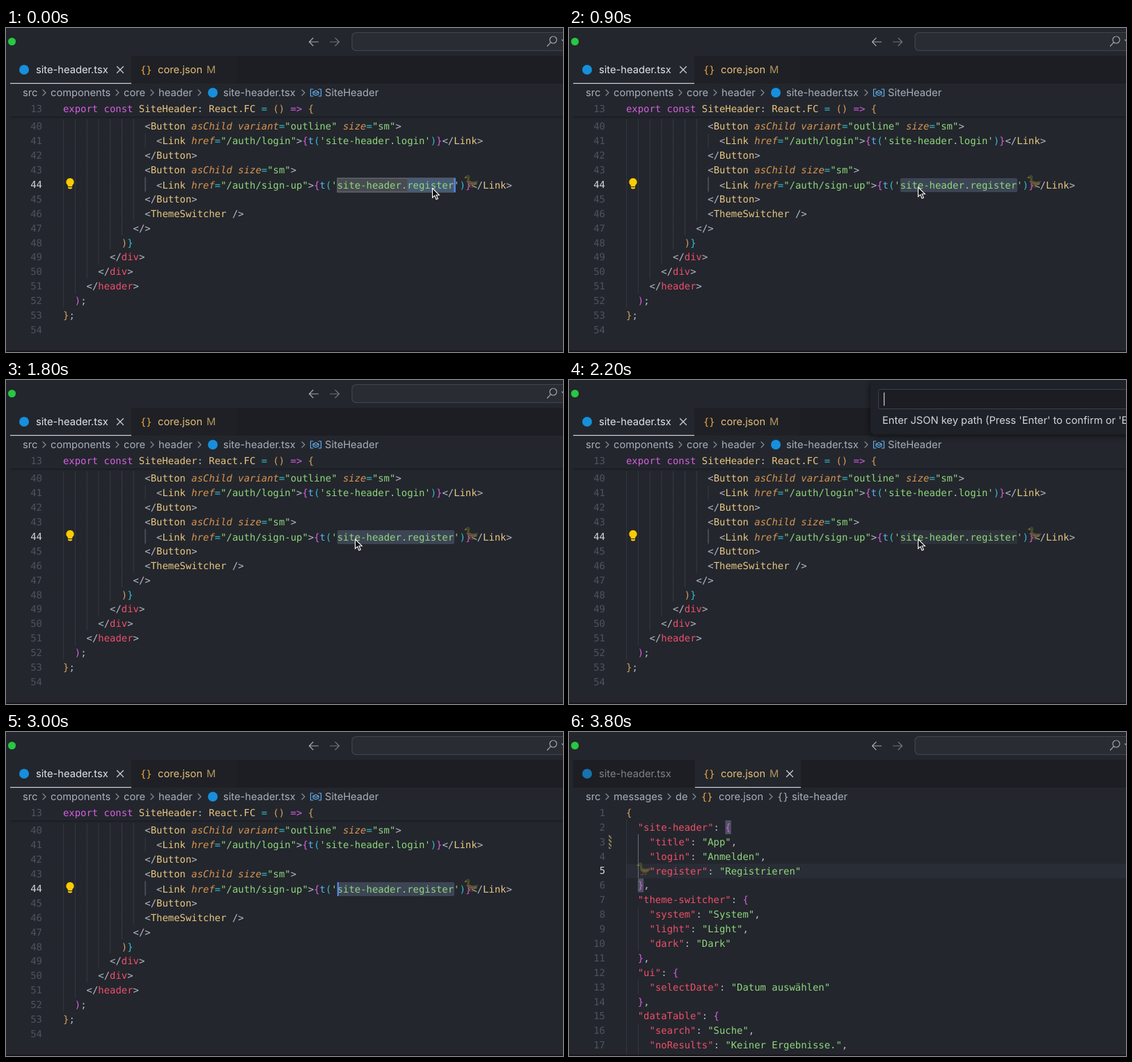
An HTML page for the animation above (3.9 s loop, 800 by 466 pixels).

```html
<!DOCTYPE html>
<html lang="en">
<head>
<meta charset="utf-8">
<title>Editor: jump to a translation key</title>
<style>
  html, body { margin: 0; width: 100%; height: 100%; overflow: hidden; background: #23262d; }
  svg { display: block; width: 800px; height: 466px; }
  text { white-space: pre; text-rendering: geometricPrecision; }
  .code { font: 13.92px "DejaVu Sans Mono", monospace; }
  .ui { font: 14.7px Inter, sans-serif; }
  .num { text-anchor: end; }
  .line { fill: none; stroke-width: 1.2; stroke-linecap: round; stroke-linejoin: round; }
</style>
</head>
<body>
<svg viewBox="0 0 800 466">
  <defs>
    <linearGradient id="shade" x2="0" y2="1">
      <stop stop-color="#14161a" stop-opacity=".55"/>
      <stop offset="1" stop-color="#14161a" stop-opacity="0"/>
    </linearGradient>
    <pattern id="hatch" width="4" height="4" patternUnits="userSpaceOnUse" patternTransform="rotate(45)">
      <rect width="4" height="2" fill="#8c8660"/>
    </pattern>
    <filter id="blur" x="-20%" y="-20%" width="140%" height="150%"><feGaussianBlur stdDeviation="5"/></filter>
  </defs>
  <rect width="800" height="466" fill="#23262d"/>
  <rect x="6" y="40" width="794" height="40" fill="#1c1e23"/>
  <circle cx="8.5" cy="19.5" r="5.5" fill="#28c840"/>
  <g class="line" stroke="#a3a7ae">
    <path d="M448.500 20H435.500M441 14.500L435.500 20L441 25.500"/>
    <path stroke="#70747b" d="M465.500 20H478.500M473 14.500L478.500 20L473 25.500"/>
    <rect x="497" y="6.500" width="320" height="26" rx="6" fill="#292c32" stroke="#42454b"/>
    <circle cx="786" cy="17" r="5"/>
    <path d="M782.400 20.600L777.500 26M798.500 17L801 19.500"/>
  </g>
  <g id="tsx"></g>
  <g id="json"></g>
  <g id="duck">
    <path d="M9 15L8 18H5M12 15L13 18H10" class="line" stroke="#8c4538"/>
    <path d="M0 4.500L2.500 2.500Q5-1 7.500 1.500Q8.500 4 7 8Q10 10 14 10L20 9Q18 15 12 15.500Q6 15 5 11Q4 8 5 5.500Z" fill="#5f5d2d"/>
    <path d="M2.500 2.500Q5-1 7.500 1.500Q8 3.500 6.500 5L4 5Z" fill="#3d5428"/>
    <path d="M8 11.500Q12 14 16 11.500" class="line" stroke="#8a7341"/>
    <path d="M0 4.500L2.500 2.500L4 5Z" fill="#a08537"/>
  </g>
  <path id="mouse" d="M0 0V13.500L3.200 10.600L5.500 16L7.800 15L5.500 9.800H9.800Z" fill="#111" stroke="#fff" stroke-width="1.1"/>
  <g id="palette">
    <rect x="433" y="2" width="380" height="78" rx="7" fill="#0c0e11" opacity=".65" filter="url(#blur)"/>
    <rect x="433" y="-6" width="380" height="84" rx="6" fill="#1e2127"/>
    <rect x="444.500" y="13.500" width="370" height="28" rx="2" fill="#1b1d23" stroke="#3b414d"/>
    <text id="entry" class="ui" x="451" y="33" fill="#c5cad3">site-header.register</text>
    <rect id="prompt" x="452" y="18" width="1.2" height="19" fill="#c5cad3"/>
    <text class="ui" x="450" y="63" fill="#d3d6dc">Enter JSON key path (Press 'Enter' to confirm or 'Escape' to cancel)</text>
  </g>
  <rect y="464" width="800" height="2" fill="#1a161b"/>
</svg>
<script>
const LOOP = 3900, CHAR = 8.38, LEFT = 82, ROW = 20.9;
const color = {
  w: '#b4bac5', y: '#e8c580', o: '#d9964f', b: '#d6a05c', c: '#35bdca', g: '#8fd67c',
  p: '#d55fde', r: '#ef4f68', u: '#61afef'
};
const $ = id => document.getElementById(id);
const escape = s => s.replace(/&/g, '&amp;').replace(/</g, '&lt;');
const col = n => LEFT + n * CHAR;
const rect = (x, y, w, h, fill, more = '') =>
  `<rect x="${x}" y="${y}" width="${w}" height="${h}" fill="${fill}" ${more}/>`;
const label = (x, y, s, fill, cls = 'ui') =>
  `<text class="${cls}" x="${x}" y="${y + 5}" fill="${fill}">${escape(s)}</text>`;
const stroke = (d, c) => `<path class="line" d="${d}" stroke="${c}"/>`;
const dot = (x, y, opacity = 1) => `<circle cx="${x}" cy="${y}" r="7" fill="#168fdd" opacity="${opacity}"/>`;

// A code line is "|"-separated; each part starts with its colour letter.
// The text of the current line sits one pixel lower.
function codeLine(src, number, y, current) {
  const indent = src.search(/\S/);
  const spans = src.trim().split('|').map(part =>
    `<tspan fill="${color[part[0]]}"${part[0] === 'o' ? ' font-style="italic"' : ''}>${escape(part.slice(1))}</tspan>`);
  return label(52, y, String(number), current ? '#d3d7de' : '#4d535f', 'code num') +
    `<text class="code" x="${col(Math.max(indent, 0))}" y="${y + (current ? 6 : 5)}">${spans.join('')}</text>`;
}

function guides(indent, y, activeLevel) {
  let out = '';
  for (let n = 0; n < indent; n += 2)
    out += rect(col(n) + .2, y - ROW / 2, 1, ROW, n === activeLevel ? '#686d76' : '#363a42');
  return out;
}

function tabs(tsxActive) {
  const [x, w] = tsxActive ? [6, 174] : [181, 152], cross = tsxActive ? 164 : 317;
  return rect(180, 40, 152, 40, '#1e2025') + rect(x, 40, w, 40, '#23262d') +
    rect(x, 79, w, 1.2, '#d0d3d8') +
    dot(26, 60, tsxActive ? 1 : .75) +
    label(43, 60, 'site-header.tsx', tsxActive ? '#e2e4e9' : '#7d828b') +
    label(193, 60, '{}', '#eba83e', 'code') +
    label(218, 60, 'core.json', '#e8bf78') +
    label(288, 60, 'M', '#b3945c') +
    stroke(`M${cross - 4.5} 55.500l9 9m0-9l-9 9`, '#d0d3d8');
}

const crumbs = (items, arrows) =>
  items.map(([x, s]) => s === '{}'
    ? label(x, 93, s, x < 250 ? '#eba83e' : '#a9afb9', 'code')
    : label(x, 93, s, '#a9afb9')).join('') +
  arrows.map(x => stroke(`M${x - 2} 89l4 4l-4 4`, '#858b95')).join('');

const tsxLines = [
  '              w<|yButton|o asChild variant|c=|g"outline"|o size|c=|g"sm"|w>',
  `                w<|yLink|o href|c=|g"/auth/login"|w>|p{|ut|c(|g'site-header.login'|c)|p}|w</|yLink|w>`,
  '              w</|yButton|w>',
  '              w<|yButton|o asChild size|c=|g"sm"|w>',
  `                w<|yLink|o href|c=|g"/auth/sign-up"|w>|p{|ut|c(|g'site-header.register'|c)|p}|w</|yLink|w>`,
  '              w</|yButton|w>',
  '              w<|yThemeSwitcher|w />',
  '            w</>',
  '          b)|c}',
  '        w</|rdiv|w>',
  '      w</|rdiv|w>',
  '    w</|rheader|w>',
  '  p)|w;',
  'b}|w;',
  ''
];

const jsonLines = `{
  "site-header": {
    "title": "App",
    "login": "Anmelden",
    "register": "Registrieren"
  },
  "theme-switcher": {
    "system": "System",
    "light": "Light",
    "dark": "Dark"
  },
  "ui": {
    "selectDate": "Datum auswählen"
  },
  "dataTable": {
    "search": "Suche",
    "noResults": "Keiner Ergebnisse.",
    "title": "Bestehende Felder auswaehlen.",`.split('\n');

function colorJson(line) {
  const indent = line.search(/\S/);
  const brace = indent ? 'p' : 'b';
  const parts = line.trim().match(/"[^"]*"|[{}]|[^"{}]+/g).map((s, i) =>
    (/[{}]/.test(s) ? brace : s[0] !== '"' ? 'w' : i ? 'g' : 'r') + s);
  return ' '.repeat(indent) + parts.join('|');
}

function buildTsx() {
  let back = '', text = '';
  tsxLines.forEach((src, i) => {
    const y = 141.3 + ROW * i, current = i === 4;
    back += guides(Math.max(src.search(/\S/), 0), y, current ? 14 : -1);
    text += codeLine(src, 40 + i, y, current);
  });
  return tabs(true) +
    crumbs([[24, 'src'], [64, 'components'], [169, 'core'], [219, 'header'], [312, 'site-header.tsx'], [458, 'SiteHeader']],
      [55, 160, 210, 278, 427]) +
    dot(297, 93) +
    stroke('M441 88h-3.500v10h3.500M449 88h3.500v10h-3.500M441 92l4-2l4 2v3l-4 2l-4-2zM441 92l4 2l4-2', '#61afef') +
    back +
    rect(0, 104, 800, 23.5, '#23262d') + rect(6, 127, 794, 4, 'url(#shade)') +
    codeLine('pexport const |ySiteHeader|w: |yReact.FC|c = |b()|p =>|b {', 13, 116) +
    '<rect id="box" x="476" y="216" width="169" height="20" fill="#484b51" stroke="#74777d"/>' +
    '<rect id="selection" y="216" height="20" rx="2"/>' +
    text +
    '<rect id="caret" y="216" width="2" height="20" fill="#528bff"/>' +
    '<path d="M92 216a5.600 5.600 0 0 0-3.300 10.100V228h6.600v-1.900A5.600 5.600 0 0 0 92 216zM89 229h6v1.500q-3 2-6 0z" fill="#fc0"/>';
}

function buildJson() {
  let out = tabs(false) +
    crumbs([[24, 'src'], [64, 'messages'], [153, 'de'], [190, '{}'], [215, 'core.json'], [299, '{}'], [320, 'site-header']],
      [55, 144, 180, 290]) +
    rect(LEFT, 189.5, 718, 20.9, '#292d35') +
    rect(57, 148, 4, 20, 'url(#hatch)') +
    rect(col(17), 127, 8.4, 20, '#4c5361') + rect(col(2), 210.5, 8.4, 20, '#4c5361');
  jsonLines.forEach((line, i) => {
    const y = 115.8 + ROW * i, current = i === 4;
    out += guides(line.search(/\S/), y, i > 1 && i < 5 ? 2 : -1) + codeLine(colorJson(line), i + 1, y, current);
  });
  return out;
}

$('tsx').innerHTML = buildTsx();
$('json').innerHTML = buildJson();

const show = (id, on) => $(id).setAttribute('display', on ? 'inline' : 'none');
const set = (id, attrs) => Object.entries(attrs).forEach(([k, v]) => $(id).setAttribute(k, v));
const blink = (t, since) => t >= since && Math.floor((t - since) / 500) % 2 === 0;

const DRAG_END = 300, OPEN = 2100, PASTE = 2450, CLOSE = 2700, JUMP = 3400;

function draw(t) {
  const inJson = t >= JUMP, open = t >= OPEN && t < CLOSE, pasted = t >= PASTE;
  show('tsx', !inJson);
  show('json', inJson);
  show('mouse', !pasted); // typing hides the pointer
  show('palette', open);

  // Dragging left extends the selection word by word.
  const p = Math.min(t / DRAG_END, 1), ease = p * p * (3 - 2 * p);
  const mouseX = 612.5 - 111 * ease;
  const start = mouseX > 576 ? 576.3 : mouseX > 518 ? 517.7 : 475.8;
  const picking = t < 100;
  set('mouse', { transform: `translate(${mouseX} ${230.5 - 1.5 * ease})` });
  set('selection', { x: start, width: 644 - start, fill: picking ? '#485b74' : open ? '#2e323a' : '#3d4555' });
  show('box', picking);
  set('caret', { x: picking ? 643.5 : start });
  show('caret', t < DRAG_END || !open && blink(t, t >= CLOSE ? CLOSE : DRAG_END));

  show('entry', pasted);
  set('prompt', { x: pasted ? 452 + $('entry').getComputedTextLength() : 452 });
  show('prompt', blink(t, pasted ? PASTE : OPEN));

  const sway = 4 * Math.sin(t / LOOP * Math.PI * 26);
  set('duck', { transform: `translate(${inJson ? '98 187' : '658 211'}) rotate(${sway} 10 18)`, opacity: .8 });
}

function tick() {
  draw(performance.now() % LOOP);
  requestAnimationFrame(tick);
}
tick();
</script>
</body>
</html>
```
